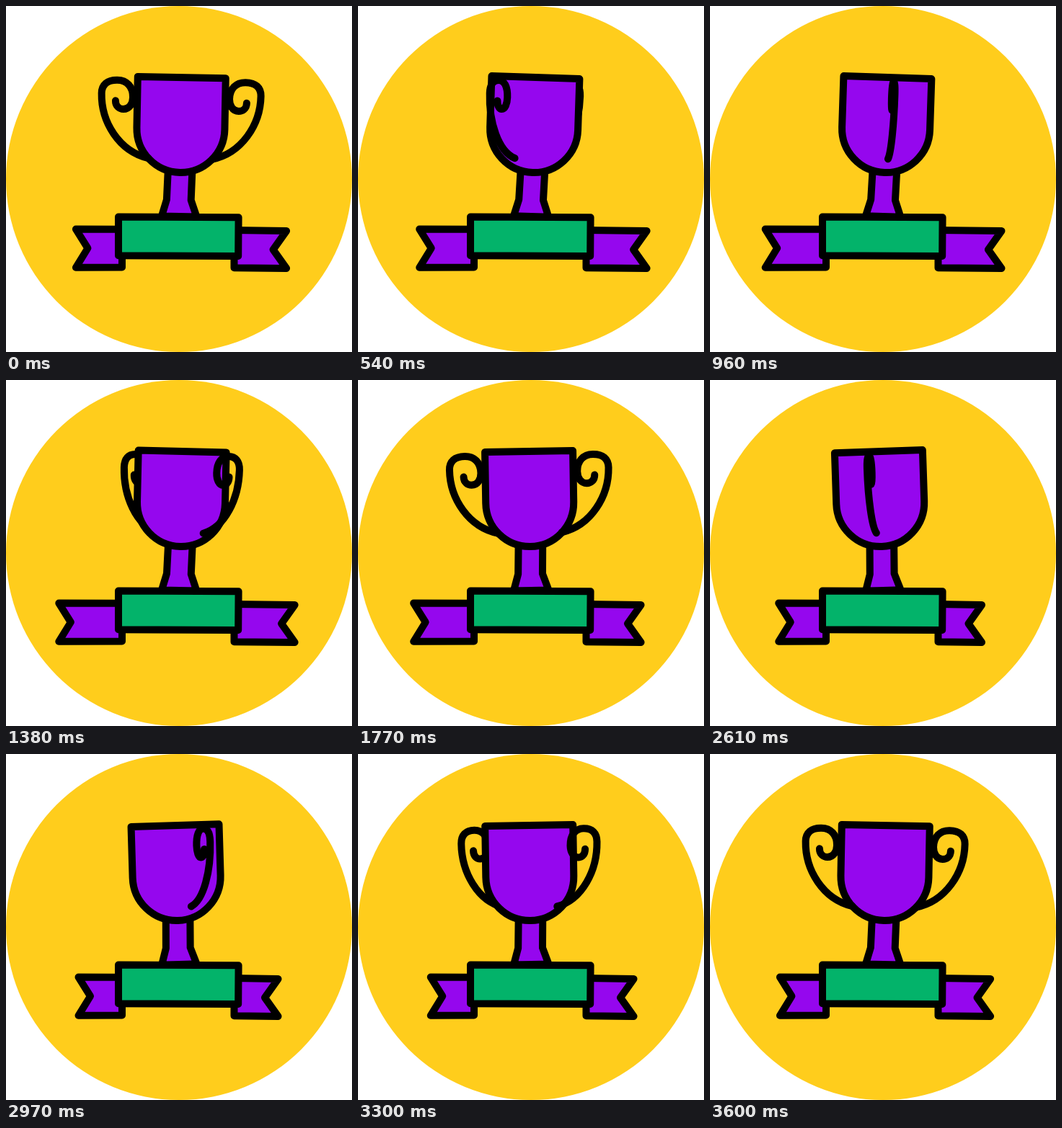
Recreate the animation shown at these times as an HTML page. Size 480 px wide and 480 px high, loop 3.63 s.

```html
<!DOCTYPE html>
<html lang="en">
<head>
<meta charset="utf-8">
<title>Spinning trophy</title>
<style>
  html, body { margin: 0; width: 100%; height: 100%; overflow: hidden; background: #fff; }
  svg { display: block; width: 100vw; height: 100vh; }
  .ink { stroke: #000; stroke-width: 10; stroke-linecap: round; stroke-linejoin: round; }
  .purple { fill: #9507ee; }
  .green { fill: #03b36a; }
  .line { fill: none; }
</style>
</head>
<body>
<svg viewBox="0 0 480 480">
  <circle cx="240" cy="240" r="240" fill="#ffcd1c"/>
  <g id="trophy" class="ink">
    <path id="back" class="line"/>
    <path class="purple" d="M223.6 229 L222.5 269 L216 292 H264.5 L256.3 269 L257.2 229Z"/>
    <path class="purple" d="M179.2 99 H301.2 V170 A61 61 0 0 1 179.2 170Z"/>
    <path id="front" class="line"/>
  </g>
  <g class="ink">
    <path id="left" class="purple"/>
    <path id="right" class="purple"/>
    <path class="green" d="M156 292.6 L322.6 293.2 L322.2 347 L156 346.3Z"/>
  </g>
</svg>
<script>
  const LOOP = 3630, SPIN = 3600, STEP = 30, AXIS = 240;
  const el = id => document.getElementById(id);
  const trophy = el('trophy'), back = el('back'), front = el('front');
  const left = el('left'), right = el('right');

  // Handle as a chain of cubic curves: [distance from axis, y]
  const HANDLE = [
    [91, 133], [91, 141], [85, 144.5], [80, 144.5],
    [72, 144.5], [67, 137], [67, 128],
    [67, 113], [76, 104.5], [89, 104.5],
    [103, 104.5], [110.5, 111], [110.5, 123],
    [110.5, 163], [85, 203], [44, 212]
  ];

  function handlePath(scale) {
    const pts = HANDLE.map(([r, y]) => (AXIS + r * scale).toFixed(2) + ' ' + y);
    return 'M' + pts[0] + ' C' + pts.slice(1).join(' ');
  }

  const smooth = s => s * s * (3 - 2 * s);

  // cubic-bezier(.75, 0, .25, 1)
  function sharp(x) {
    let lo = 0, hi = 1, s = 0.5;
    for (let i = 0; i < 24; i++) {
      s = (lo + hi) / 2;
      if (s * (2.25 + s * (2.5 * s - 3.75)) < x) lo = s; else hi = s;
    }
    return smooth(s);
  }

  // Eases from 1 at the peak time to -1 and back
  function swing(t, peak, ease) {
    const u = ((t - peak + SPIN) % SPIN) / (SPIN / 2);
    return u < 1 ? 1 - 2 * ease(u) : 2 * ease(u - 1) - 1;
  }

  function draw(t) {
    const side = t < SPIN / 2 || t >= SPIN ? -1 : 1;
    const scale = side * swing(t, 0, smooth);
    front.setAttribute('d', handlePath(scale));
    back.setAttribute('d', handlePath(-scale));
    trophy.setAttribute('transform', `rotate(${1.9 * swing(t, 730, sharp)} 240.5 290)`);

    const l = 87.3 - 14 * swing(t, 1350, smooth);
    const r = 390.5 + 14 * swing(t, 960, smooth);
    left.setAttribute('d', `M161 309.8 L${l} 309.6 L${l + 16.5} 336 L${l} 362.8 L161 362.4 V342`);
    right.setAttribute('d', `M317 311 L${r} 312 L${r - 18.5} 338 L${r} 364 L316.5 363.2 V342`);
  }

  const start = performance.now();
  function tick() {
    const t = (performance.now() - start) % LOOP;
    draw(Math.floor(t / STEP) * STEP);
    requestAnimationFrame(tick);
  }
  tick();
</script>
</body>
</html>
```
